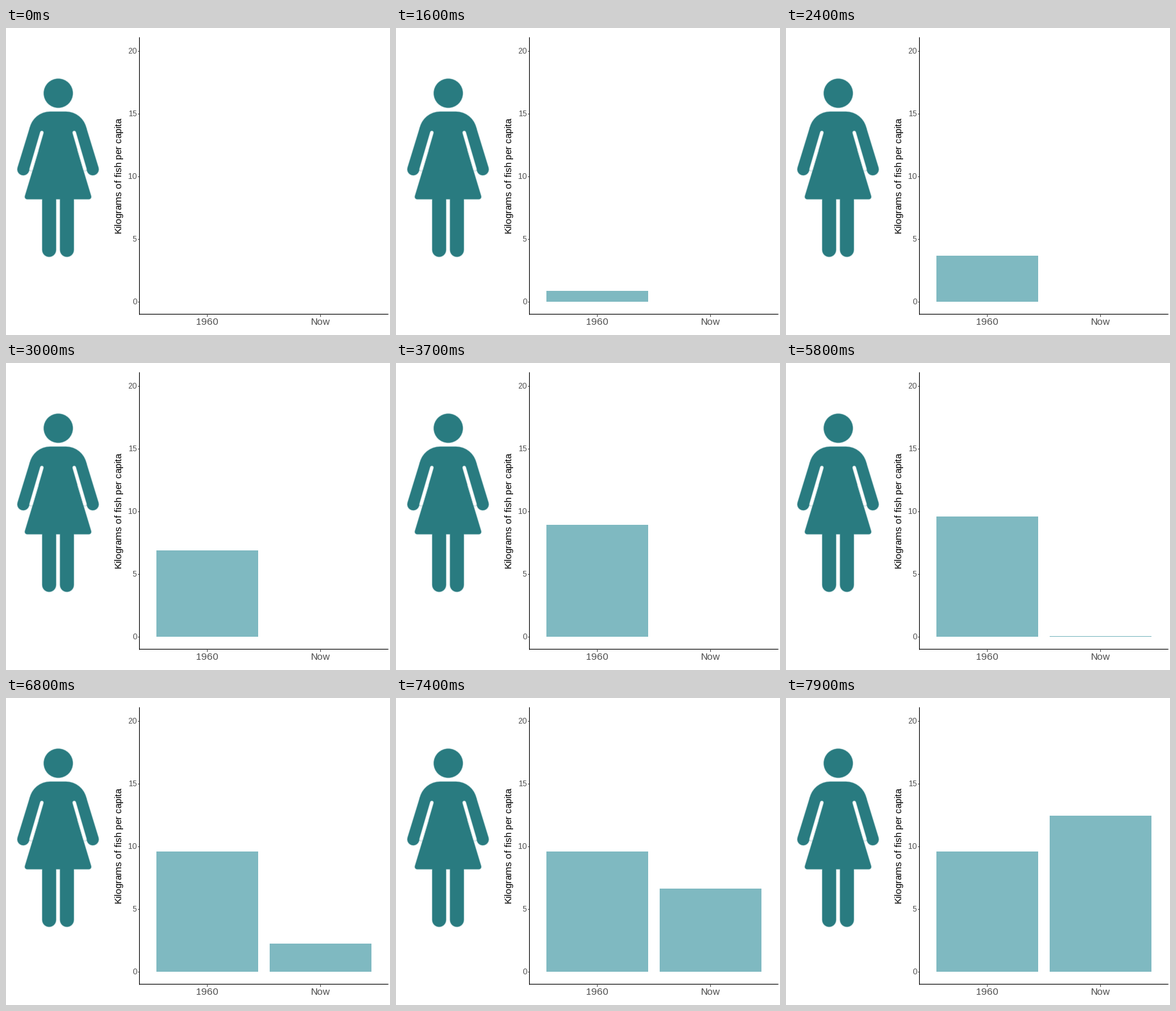
Write a matplotlib script that moves like this. It is 600 by 480 pixels and loops after 8000 ms.

```python
import matplotlib.pyplot as plt
from matplotlib.animation import FuncAnimation
from matplotlib.patches import Circle, Polygon, Rectangle

W, H, DPI = 600, 480, 100
PX = 72 / DPI  # points per pixel
TEAL, HALO, BAR = "#297b80", "#a3c9cb", "#7fb9c1"
INK, TICK, LABEL = "#000000", "#333333", "#4d4d4d"
BIG = 44 / 3  # 11 pt at 96 dpi
SMALL = 0.8 * BIG
BASE, UNIT = 428, 19.6
GROWTH = 46  # steps a bar takes to reach its full height
MID = 81.3  # symmetry axis of the figure

plt.rcParams.update({
    "font.family": "Liberation Sans",
    "text.hinting": "force_autohint",
    "text.hinting_factor": 1,
})

fig = plt.figure(figsize=(W / DPI, H / DPI), dpi=DPI, facecolor="white")
ax = fig.add_axes([0, 0, 1, 1])
ax.set_xlim(0, W)
ax.set_ylim(H, 0)
ax.axis("off")


def line(xs, ys, color):
    ax.plot(xs, ys, color=color, lw=1.07 * PX, solid_capstyle="butt")


def label(x, y, text, size, color=LABEL, **kw):
    ax.text(x, y, text, fontsize=size * PX, color=color, va="baseline", **kw)


def flip(point):
    return 2 * MID - point[0], point[1]


def capsule(a, b, width, color):
    ax.plot(*zip(a, b), color=color, lw=width * PX, solid_capstyle="round", snap=False)


def pair(a, b, width, color):
    capsule(a, b, width, color)
    capsule(flip(a), flip(b), width, color)


def draw_body(color, grow):
    waist, hem, shoulder = (64.5, 160), (33.1, 264), (69, 163.5)
    ax.add_patch(Circle((81.7, 102), 23 + grow / 2, fc=color, lw=0))
    ax.add_patch(Polygon([waist, hem, flip(hem), flip(waist)], fc=color, ec=color,
                         lw=(8 + grow) * PX, joinstyle="round", zorder=2))
    capsule(shoulder, flip(shoulder), 66 + grow, color)
    pair((46, 159), (27, 221), 19.2 + grow, color)
    pair((67.4, 256), (67.4, 347), 22.2 + grow, color)


def draw_woman():
    draw_body(HALO, 0.6)
    draw_body(TEAL, -0.8)
    for color, width in ((HALO, 6), ("white", 4.6)):
        pair((56, 163.5), (39.2, 221), width, color)


def draw_axes():
    line([208, 208], [14, 448], INK)
    line([208, 597], [447, 447], INK)
    for value in range(0, 21, 5):
        y = BASE - UNIT * value
        line([205.5, 208], [y, y], TICK)
        label(204, y + 4, str(value), SMALL, ha="right")
    for x, name in ((314, "1960"), (491, "Now")):
        line([x, x], [448, 450.7], TICK)
        label(x, 464, name, BIG, ha="center")
    label(181, 231, "Kilograms of fish per capita", BIG, INK,
          ha="center", rotation=90, rotation_mode="anchor")


def cubic_in_out(t):
    t = min(max(t, 0), 1)
    return 4 * t ** 3 if t < 0.5 else 1 - 4 * (1 - t) ** 3


draw_woman()
draw_axes()

# left edge, full height, first step
BARS = [(235, 188.2, 3), (412, 394.1, 54)]
rects = [ax.add_patch(Rectangle((x, BASE), 159, 0, fc=BAR, lw=0, antialiased=False))
         for x, _, _ in BARS]


def update(i):
    for rect, (_, full, start) in zip(rects, BARS):
        top = round(BASE - full * cubic_in_out((i - start) / GROWTH))
        rect.set_y(top)
        rect.set_height(BASE - top)
        rect.set_visible(top < BASE)
    return rects


anim = FuncAnimation(fig, update, frames=80, interval=100, repeat=True, repeat_delay=0)
plt.show()
```
